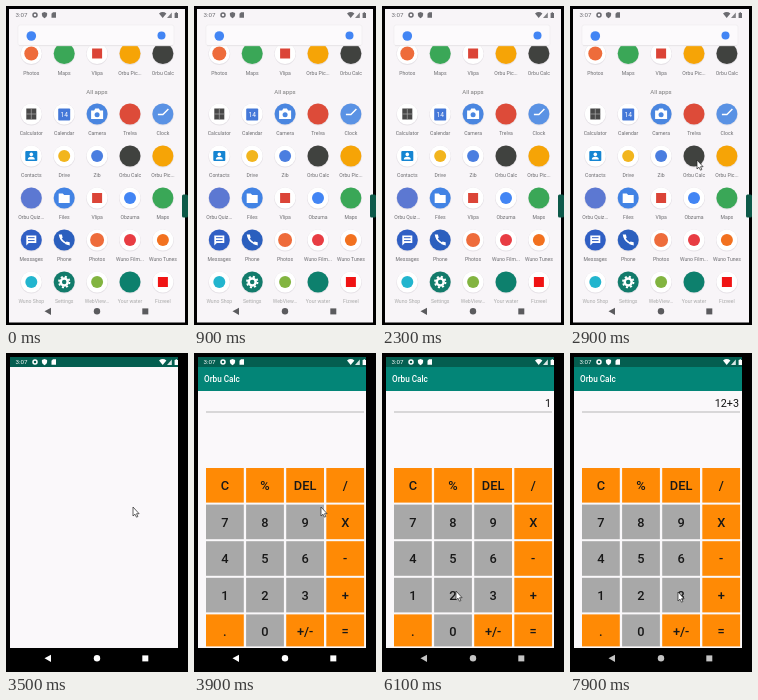
An HTML page that plays this animation: 182 by 319 pixels, repeating every 8 s.

```html
<!DOCTYPE html>
<html lang="en">
<head>
<meta charset="utf-8">
<title>Calculator demo</title>
<style>
html, body { margin: 0; width: 100%; height: 100%; overflow: hidden; background: #000; }
svg { display: block; width: 100%; height: 100%; font-family: Roboto, "Open Sans", sans-serif; }
.mid { text-anchor: middle; }
.end { text-anchor: end; }

#drawer, #launch, #app, #cursor, #lines, #appNav { animation: 8s infinite; }
#drawer { animation-name: drawer; animation-timing-function: step-end; }
#launch { animation-name: launch; transform-origin: 124px 150px; }
#app { animation-name: app; animation-timing-function: step-end; }
#appNav { animation-name: dim; animation-timing-function: step-end; }
#lines { animation-name: typing; animation-timing-function: step-end; }
#cursor { animation-name: point; animation-timing-function: ease-in-out; }

@keyframes drawer { 0% { opacity: 1 } 42.5%, 100% { opacity: 0 } }
@keyframes launch {
  0%, 40% { opacity: 0; transform: scale(.3) }
  42.5%, 100% { opacity: 1; transform: none }
}
@keyframes app { 0% { opacity: 0 } 46.25%, 100% { opacity: 1 } }
@keyframes dim { 0% { fill: #fff } 57.5%, 100% { fill: #c4c4c4 } }
@keyframes typing {
  0% { transform: translateY(0) }
  67.5% { transform: translateY(-20px) }
  78.75% { transform: translateY(-40px) }
  88.75% { transform: translateY(-60px) }
  97.5%, 100% { transform: translateY(-80px) }
}
@keyframes point {
  0%, 31.25% { transform: translate(184px, 190px) }
  36.25%, 53.75% { transform: translate(127px, 154px) }
  62.5%, 68.75% { transform: translate(31px, 240px) }
  75%, 80% { transform: translate(74px, 238px) }
  86.25%, 90% { transform: translate(150px, 239px) }
  95%, 100% { transform: translate(108px, 239px) }
}
</style>
</head>
<body>
<svg viewBox="0 0 182 319" preserveAspectRatio="none">
  <defs>
    <clipPath id="screen"><rect x="4" y="4" width="168" height="311"/></clipPath>
    <clipPath id="field"><rect x="12" y="42" width="158" height="16"/></clipPath>
    <g id="status">
      <text x="9.5" y="11.4" font-size="6.2">3:07</text>
      <circle cx="29" cy="9" r="2" fill="none" stroke="currentColor" stroke-width="1.5"/>
      <path d="M38.5 6l2.6 1v2q0 2-2.6 3.2q-2.6-1.2-2.6-3.2v-2z"/>
      <path d="M47 6.2h3v5.6h-4.5v-4z"/>
      <path d="M153 7.4q3.7-2.8 7.4 0l-3.7 4.6z"/>
      <path d="M161 12l4.8-5.4v5.4z" opacity=".85"/>
      <path d="M168.6 7h1v-.8h1.4v.8h1v5h-3.4z"/>
    </g>
    <g id="nav">
      <path d="M38.5 305.3l6.5-3.6v7.2z"/>
      <circle cx="91" cy="305.3" r="3.2"/>
      <rect x="136.3" y="302.4" width="6" height="6"/>
    </g>
  </defs>

  <rect width="182" height="319"/>

  <g id="drawer">
    <rect x="3" y="3" width="176" height="313.5" fill="#f8f5f8"/>
    <rect x="176" y="188.5" width="6" height="23" rx="1.5" fill="#0d5a49"/>
    <g id="icons"></g>
    <rect x="12" y="19" width="156" height="20.5" rx="2" fill="#fcfafc" stroke="#f0edf0" stroke-width=".7"/>
    <path d="M13 39.7h154" stroke="#e4e1e5" stroke-width=".8"/>
    <circle cx="25.3" cy="30" r="4.8" fill="#4285f4"/>
    <circle cx="155.5" cy="29.5" r="4" fill="#4285f4"/>
    <text class="mid" x="91" y="88" font-size="6" fill="#777">All apps</text>
    <use href="#status" fill="#6b6b70" color="#6b6b70"/>
    <use href="#nav" fill="#5b5b5e"/>
  </g>

  <g clip-path="url(#screen)">
    <g id="launch">
      <rect x="4" y="4" width="168" height="291" fill="#faf8fa"/>
      <rect x="4" y="4" width="168" height="10" fill="#045e50"/>
      <rect x="4" y="295" width="168" height="20"/>
      <use href="#status" fill="#fff" color="#fff"/>
      <use id="appNav" href="#nav" fill="#fff"/>
    </g>
  </g>

  <g id="app">
    <rect x="4" y="14" width="168" height="24" fill="#038577"/>
    <text x="10" y="29.2" font-size="8.2" font-weight="500" fill="#fff">Orbu Calc</text>
    <path d="M12 59h158" stroke="#a5a5a5" stroke-width=".8"/>
    <g clip-path="url(#field)"><g id="lines" class="end" font-size="10.8" fill="#111"></g></g>
    <g id="keys" class="mid" font-size="12.8" font-weight="500"></g>
  </g>

  <path id="cursor" d="M0 0v9l2-1.8 1.5 3 1.4-.7-1.4-2.8h2.6z" fill="#fff" stroke="#222" stroke-width=".7"/>
</svg>

<script>
const put = (id, markup) => { document.getElementById(id).innerHTML = markup; };

const disc = (color, glyph = "") => `<circle r="10.5" fill="${color}"/>${glyph}`;
const dot = (color, r = 6) => disc("#fff", `<circle r="${r}" fill="${color}"/>`);
const box = color => disc("#fff", `<rect x="-5" y="-5" width="10" height="10" fill="${color}"/>`);
const white = d => `<path d="${d}" fill="#fff"/>`;

const art = {
  photos: dot("#ee6c3b", 7),
  maps: disc("#3aa757"),
  mail: box("#db4437"),
  pic: disc("#f6a406"),
  calc: disc("#40423f"),
  sums: disc("#fff", `<rect x="-5" y="-5.5" width="10" height="11" fill="#484848"/>
    <path d="M0-5.5v11M-5 0h10" stroke="#aaa" stroke-width=".7"/>`),
  date: disc("#fff", `<rect x="-6" y="-5.5" width="12" height="12" rx="1" fill="#4478d8"/>
    <text class="mid" y="3.4" font-size="6.6" fill="#fff">14</text>`),
  camera: disc("#4a86e0", white("M-6-3.5h3l1.2-2h3.6l1.2 2h3v8.5h-12z") +
    `<circle cy=".7" r="2.5" fill="#4a86e0"/>`),
  web: disc("#dd4b39"),
  clock: disc("#5a92e4", `<path d="M-5 .5H0L5.5-5" fill="none" stroke="#fff" stroke-width="1.4"/>`),
  people: disc("#fff", `<rect x="-6" y="-5" width="12" height="10" rx="1" fill="#1585d2"/>
    <circle cy="-1.6" r="1.8" fill="#fff"/>` + white("M-3.5 3.6q0-2.8 3.5-2.8t3.5 2.8z")),
  drive: dot("#f2b51d"),
  call: dot("#4a7ee0"),
  quiz: disc("#5c78d2"),
  files: disc("#4283e4", white("M-5.5-4.5h4l1.5 1.5h5.5v8h-11z")),
  find: dot("#4285f4"),
  chat: disc("#305fc4", white("M-5-4.5h10v7.5h-7.5l-2.5 2.5z") +
    `<path d="M-3.3-2.3h6.6M-3.3.6h6.6" stroke="#305fc4"/>`),
  phone: disc("#2b5fbe", `<path d="M-4-4.5q.5 6.5 8 8.5" fill="none" stroke="#fff" stroke-width="1.7"/>` +
    white("M-5.5-5.5h3.2l.8 3.2-2.5 1.5zM5.5 5.5v-3.2l-3.2-.8-1.5 2.5z")),
  film: dot("#e83d43"),
  tunes: dot("#f2711f"),
  shop: dot("#22b5ce"),
  gear: disc("#127b6b", `<circle r="3.5" fill="none" stroke="#fff" stroke-width="2.5"/>
    <circle r="5.3" fill="none" stroke="#fff" stroke-width="1.8" stroke-dasharray="2.1 2.06"/>`),
  view: dot("#82b440"),
  water: disc("#0d806d"),
  video: box("#f01414")
};

const rows = [
  [47.5, "photos:Photos maps:Maps mail:Vlipa pic:Orbu_Pic... calc:Orbu_Calc"],
  [108, "sums:Calculator date:Calendar camera:Camera web:Trelva clock:Clock"],
  [150, "people:Contacts drive:Drive call:Zib calc:Orbu_Calc pic:Orbu_Pic..."],
  [192, "quiz:Orbu_Quiz... files:Files mail:Vlipa find:Obzuma maps:Maps"],
  [234, "chat:Messages phone:Phone photos:Photos film:Wuno_Film... tunes:Wuno_Tunes"],
  [276, "shop:Wuno_Shop gear:Settings view:WebView... water:Your_water video:Fizveel"]
];

put("icons", rows.map(([y, apps]) => apps.split(" ").map((app, i) => {
  const [kind, label] = app.split(":");
  const ink = y > 260 ? "#aaa" : "#6c6c70";
  return `<g transform="translate(${25.3 + i * 32.9} ${y})">
    <circle cy=".5" r="10.9" fill="#e6e2e7"/>${art[kind]}
    <text class="mid" y="21.3" font-size="5.1" fill="${ink}">${label.replace("_", " ")}</text></g>`;
}).join("")).join(""));

put("lines", ["", "1", "12", "12+", "12+3"].map((line, i) =>
  `<text x="169" y="${53.8 + i * 20}">${line}</text>`).join(""));

const keys = "C % DEL / 7 8 9 X 4 5 6 - 1 2 3 + . 0 +/- =".split(" ");
put("keys", keys.map((key, i) => {
  const col = i % 4, row = Math.floor(i / 4);
  const x = 12 + col * 40.1, y = 115 + row * 36.6;
  const color = /\d/.test(key) ? "#a8a8a8" : "#ff8a05";
  return `<rect x="${x}" y="${y}" width="37.8" height="${row < 4 ? 34.6 : 32}" fill="${color}"/>
    <text x="${x + 18.9}" y="${y + 22}" fill="#181818">${key}</text>`;
}).join(""));
</script>
</body>
</html>
```
